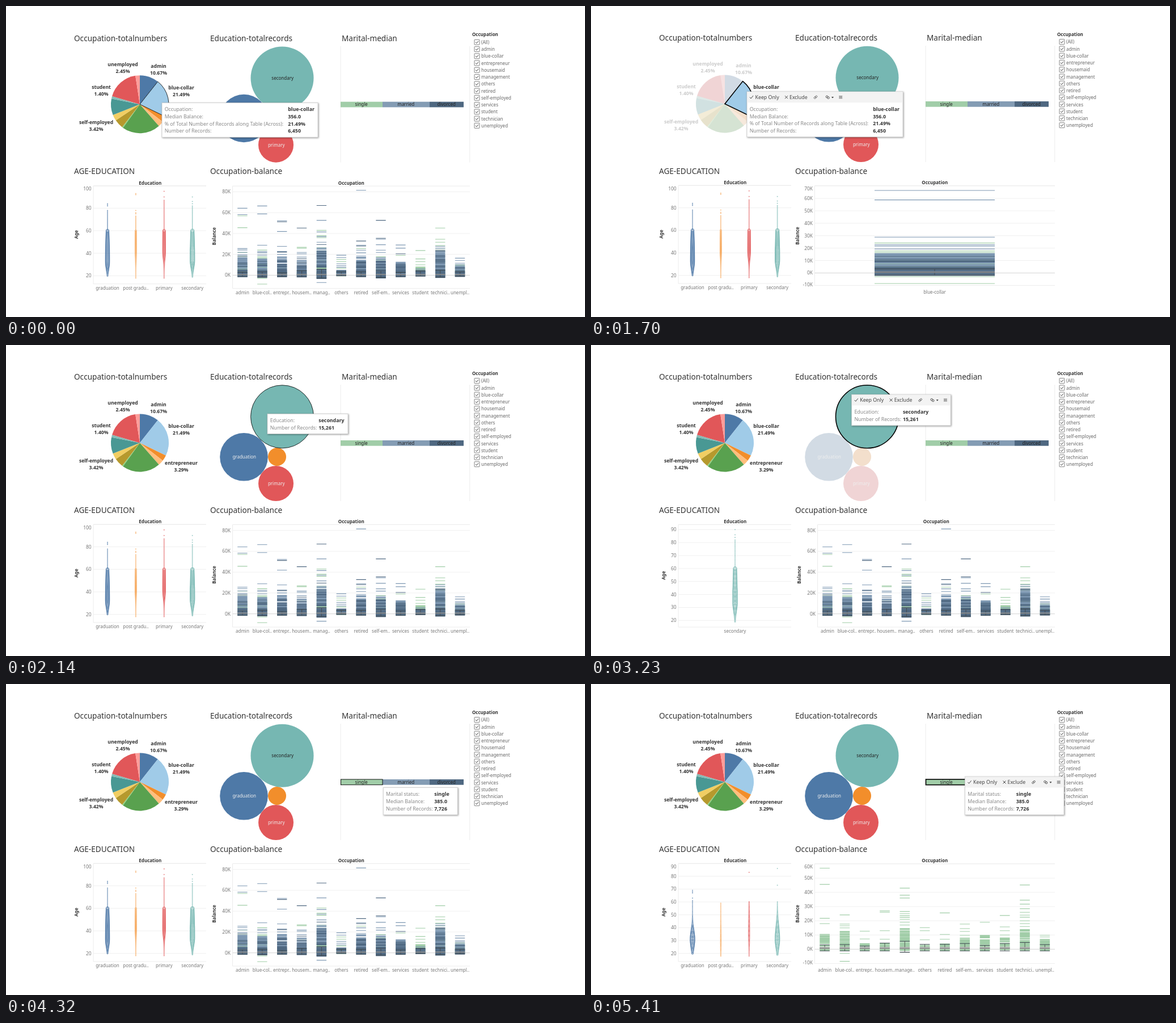
Write an HTML page that moves like this. It is 1021 by 548 pixels and loops after 6.5 s.

```html
<!DOCTYPE html>
<html lang="en">
<head>
<meta charset="utf-8">
<title>Occupation dashboard</title>
<style>
html, body { margin: 0; height: 100%; overflow: hidden; background: #fff; }
svg { display: block; width: 1021px; height: 548px; font: 8px "Noto Sans", sans-serif; fill: #666; }
.title { font-size: 13.6px; font-weight: 300; fill: #333; }
.bold { font-weight: 600; fill: #333; }
.tip { font-size: 8.8px; }
.tip > rect { filter: drop-shadow(1px 1px 1.5px #0006); }
</style>
</head>
<body>
<svg id="stage" viewBox="0 0 1021 548"></svg>
<script>
const SINGLE = '#a1cda8', MARRIED = '#7e98b2', DIVORCED = '#4f6881';
const BLUE = '#4e79a7', ORANGE = '#f28e2b', RED = '#e15759', TEAL = '#76b7b2';

const text = (x, y, s, attrs = '') => `<text x="${x}" y="${y}" ${attrs}>${s}</text>`;
const mid = (x, y, s, attrs = '') => text(x, y, s, 'text-anchor="middle" ' + attrs);
const rect = (x, y, w, h, fill, attrs = '') =>
  `<rect x="${x}" y="${y}" width="${w}" height="${h}" fill="${fill}" ${attrs}/>`;
const path = (d, stroke, width = 1, fill = 'none') =>
  `<path d="${d}" stroke="${stroke}" stroke-width="${width}" fill="${fill}"/>`;
const circle = (x, y, r, fill, attrs = '') => `<circle cx="${x}" cy="${y}" r="${r}" fill="${fill}" ${attrs}/>`;
const range = (a, b) => Array.from({ length: b - a + 1 }, (_, i) => a + i);

function random(seed) {
  return () => (seed = (seed * 16807) % 2147483647) / 2147483647;
}

// Pie: name, share, colour, label position
const slices = [
  ['admin', 10.67, BLUE, 269, 108], ['blue-collar', 21.49, '#a0cbe8', 309, 146],
  ['entrepreneur', 3.29, ORANGE, 309, 211], ['housemaid', 3.1, '#ffbe7d'],
  ['management', 21.35, '#59a14f'], ['others', .6, '#8cd17d'], ['retired', 5.1, '#b6992d'],
  ['self-employed', 3.42, '#f1ce63', 159, 207], ['services', 9.1, '#499894'],
  ['student', 1.4, '#86bcb6', 168, 145], ['technician', 18.03, RED], ['unemployed', 2.45, '#ff9d9a', 206, 105]
];

function pie({ pieHover, pieSelect }) {
  const cx = 236, cy = 172.5, r = 51;
  const point = share => {
    const a = share / 50 * Math.PI;
    return `${cx + r * Math.sin(a)} ${cy - r * Math.cos(a)}`;
  };
  let sum = 0, out = pieSelect ? circle(cx, cy, r, '#f4f4f4') : '', labels = '', outline = '';
  for (const [name, share, color, x, y] of slices) {
    const d = `M${cx} ${cy}L${point(sum)}A${r} ${r} 0 0 1 ${point(sum += share)}Z`;
    const picked = name === 'blue-collar', faded = pieSelect && !picked;
    out += `<path d="${d}" fill="${color}" opacity="${faded ? .2 : 1}"/>`;
    if (picked && (pieHover || pieSelect)) outline = path(d, '#000', pieSelect ? 1.6 : .8);
    if (!x) continue;
    const attrs = `class="bold" font-size="8.6" opacity="${faded ? .25 : 1}"`;
    labels += mid(x, y, name, attrs) + mid(x, y + 12.3, share.toFixed(2) + '%', attrs);
  }
  return out + outline + labels;
}

function bubbles({ bubbleHover, bubbleSelect }) {
  return [
    ['graduation', 419.5, 197.3, 42.3, BLUE], ['', 478, 197, 16, ORANGE],
    ['primary', 476, 244, 31, RED], ['secondary', 487, 126.3, 55.5, TEAL]
  ].map(([name, x, y, r, color]) => {
    const main = name === 'secondary', faded = bubbleSelect && !main;
    const stroke = main && (bubbleHover || bubbleSelect) ? `stroke="#000" stroke-width="${bubbleSelect ? 1.6 : .8}"` : '';
    return (faded ? circle(x, y, r, '#f4f4f4') : '') + circle(x, y, r, color, `${stroke} opacity="${faded ? .2 : 1}"`) +
      mid(x + .7, y + 3, name, `fill="${main ? '#222' : '#eee'}"`);
  }).join('');
}

function marital({ barHover, barSelect }) {
  let out = path('M590 70V275M817.8 70V275', '#ececec');
  const bars = [['single', 590, 74, SINGLE], ['married', 664, 83, '#849cb4'], ['divorced', 747, 60, DIVORCED]];
  for (const [name, x, w, color] of barSelect ? bars.slice(0, 1) : bars)
    out += rect(x, 168, w, 9.7, color) + mid(x + w / 2 - .3, 175.8, name, 'fill="#222"');
  if (barHover || barSelect) out += rect(590.5, 168, 73.5, 9.7, 'none', `stroke="#000" stroke-width="${barSelect ? 1.6 : .9}"`);
  return out;
}

function legend() {
  return text(822, 52.5, 'Occupation', 'class="bold"') + ['(All)', ...slices.map(s => s[0])].map((name, i) => {
    const y = 63.3 + i * 12.25;
    return rect(826, y - 4.7, 9, 9, '#fff', 'stroke="#777" stroke-width=".9" rx=".6"') +
      path(`M828 ${y - .2}l1.8 2 3.3-4`, '#444') + text(838, y + 3, name);
  }).join('');
}

// Axis ticks: [label, y, label y when pushed inside]
function grid(left, right, bottom, ticks) {
  return path(`M${left} 316.5V${bottom}M${left} ${bottom}H${right}M${left} 316.5H${right}`, '#ececec') +
    ticks.map(([label, y, labelY = y]) =>
      path(`M${left} ${y}H${right}`, label === '0K' ? '#d4d4d4' : '#f0f0f0') +
      text(left - 3.5, labelY + 3, label, 'text-anchor="end" font-size="8.4" fill="#777"')).join('');
}
const axisTitle = (x, y, s) => mid(0, 0, s, `class="bold" transform="translate(${x} ${y}) rotate(-90)"`);

// Age dots: name, colour, first age, last age, far ages, largest radius, peak age, spread above it
const ages = [
  ['graduation', BLUE, 20, 78, [82, 83, 84], 3.9, 33, 29], ['post gradu..', '#f5a04c', 18, 73, [75, 76, 78, 92, 93], 1.5, 42, 30],
  ['primary', RED, 18, 87, [90, 95], 2.7, 42, 40], ['secondary', TEAL, 19, 82, [84, 86, 90], 4.2, 34, 32]
];
const singleAges = [
  ['graduation', BLUE, 20, 61, [63, 67, 68, 69], 4.3, 31, 7], ['post gradu..', '#f5a04c', 18, 59, [], .9, 30, 9],
  ['primary', RED, 18, 60, [83], 1.3, 35, 14], ['secondary', TEAL, 19, 60, [73, 86], 4.2, 31, 10]
];

function ageChart({ bubbleSelect, barSelect }) {
  const scale = bubbleSelect ? 2.286 : barSelect ? 2.267 : 1.985;
  const zero = bubbleSelect ? 485.3 : 474.7, bottom = bubbleSelect ? 497 : 489;
  const at = age => zero - (age - 20) * scale;
  const step = bubbleSelect || barSelect ? 10 : 20, ticks = [];
  for (let a = 20; a <= (step === 10 ? 90 : 100); a += step) ticks.push([a, at(a), Math.max(at(a), 321.7)]);
  const columns = bubbleSelect ? ages.slice(3) : barSelect ? singleAges : ages;
  return mid(254.3, 314, 'Education', 'class="bold"') + grid(154, 353, bottom, ticks) +
    axisTitle(bubbleSelect || barSelect ? 131 : 127, bubbleSelect ? 406 : 402, 'Age') +
    columns.map(([name, color, first, last, far, max, peak, spread], i) => {
      const x = bubbleSelect ? 254 : 179 + i * 49.9;
      const dots = [...range(first, last), ...far].map(a => {
        const bump = Math.exp(-(((a - peak) / (a < peak ? 7 : spread)) ** 2) / 2);
        const r = a > 60 ? .5 : .5 + (max - .5) * bump;
        return circle(x, at(a), r, 'none');
      }).join('');
      return `<g stroke="${color}" stroke-width=".9">${dots}</g>` + mid(x, bottom + 10, name, 'fill="#777"');
    }).join('');
}

// Balances in thousands: name, dense top of singles and others, whisker top, low end, outliers by status
const balances = [
  ['admin', 10.5, 17, 3, -1.7, [57, 45.6, 21.7, 18], [64.2, 58.2, 25.6, 24.2, 22, 19.5], [18.2]],
  ['blue-col..', 13, 16.5, 3.2, -2.2, [24.1, 17.7, 16.5, 15, -3, -8.5], [66.4, 58.8, 28.8, 22.6, 21.5, 19.3], []],
  ['entrepr..', 4, 18, 2.2, -1.7, [12.7, 7.2], [52.2, 41.9, 27.7, 22.8, 20], [51.2, 22.2]],
  ['housem..', 4.5, 15, 4.3, -1.9, [26.9, 26, 13, 7], [21.8, 20.5, 17.5], [45.2, 16]],
  ['manag..', 15, 27, 5.6, -3.5, [43, 38, 36, 26.5, 25, 23.5, 22.3, 21, 19, 17], [52.7, 41.5, 37, 31.6, -7], [66.9, 29.5]],
  ['others', 3, 5, 3.4, -.8, [13, 6.6, 15.2], [19.2, 17, 11, 9.2, 7.6], []],
  ['retired', 4, 19, 3.4, -1.7, [25.5, 10.4, 7], [81.4, 28.8, 24, 21.5], [32.8, 28]],
  ['self-em..', 8, 17, 4, -2.9, [17.7, 14.5, 12.5, 9.8], [34.5, 29.3, 24, 21.8], [52.7, 35.5]],
  ['services', 10, 13, 2.7, -1.9, [19], [29, 26], [20.5]],
  ['student', 8, 4.5, 4, -.9, [23.7, 15.7, 13, 10], [6], []],
  ['technici..', 14, 23, 4.7, -2.3, [45.2, 34.5, 31.7, 28.5, 26, 24, 22.5, 20, 18, 16], [27.7, 26], [24, 23]],
  ['unempl..', 7, 9, 3.2, -1.2, [9.8, 8.6], [16.3, 14.2, 11.5, 10.2], []]
];

function dense(rnd, top, low, perK, power) {
  const up = Array.from({ length: top * perK }, () => top * rnd() ** power);
  const down = Array.from({ length: -low * perK }, () => low * rnd());
  return [...up, ...down];
}

function balanceChart({ pieSelect, barSelect }) {
  const left = pieSelect || barSelect ? 394.5 : 399.5;
  const scale = pieSelect ? 2.19 : barSelect ? 2.505 : 1.8375;
  const zero = pieSelect ? 470.4 : barSelect ? 467.3 : 473.7;
  const bottom = pieSelect || barSelect ? 492.5 : 497;
  const at = k => +(zero - k * scale).toFixed(1);
  const [lo, hi, step] = pieSelect ? [-10, 70, 10] : barSelect ? [-10, 60, 10] : [0, 80, 20];
  const ticks = [];
  for (let k = lo; k <= hi; k += step) ticks.push([k + 'K', at(k), Math.min(490.7, Math.max(at(k), 321.7))]);
  const mx = (left + 818) / 2;
  let out = mid(mx, 314, 'Occupation', 'class="bold"') + grid(left, 818, bottom, ticks) +
    axisTitle(left - (left > 395 ? 30 : 28), 405, 'Balance');

  balances.forEach(([name, sTop, mTop, whisker, low, s, m, d], i) => {
    if (pieSelect && i !== 1) return;
    const rnd = random(917 + i * 7331), pitch = (818 - left) / 12;
    const x = pieSelect ? 606 : left + pitch * (i + .5), w = pieSelect ? 212 : pitch / 2;
    const marks = (values, color) =>
      path(values.map(k => `M${(x - w / 2).toFixed(1)} ${at(k)}h${w.toFixed(1)}`).join(''), color, 1.1);
    const box = (a, b, color, attrs = '') => rect(x - w / 2, at(b), w, (b - a) * scale, color, attrs);
    out += marks([...dense(rnd, sTop, -1, 6, 1.2), ...s], SINGLE);
    if (!barSelect) {
      out += marks([...dense(rnd, mTop, low, 4.5, 1.4), ...m], MARRIED) +
        marks([...dense(rnd, mTop * .85, low, 1.9, 1.8), ...d], DIVORCED) +
        marks(dense(rnd, 4.8, low, 2.2, .9), DIVORCED);
    }
    const foot = barSelect ? (i === 4 ? -2.1 : -1.2) : low * .75;
    out += box(.1, barSelect ? 1.7 : 1.3, '#b9b9b9', `opacity="${barSelect ? .9 : .65}"`) +
      path(`M${x} ${at(whisker)}V${at(1.4)}M${x} ${at(.1)}V${at(foot)}`, '#444', .8) +
      marks([whisker, foot], '#3f4a50') + marks([.6], '#777');
    const label = pieSelect ? 'blue-collar' : barSelect && i === 4 ? 'manage..' : name;
    out += mid(x, 507, label, 'fill="#777"');
  });
  return out;
}

function tooltip({ x, y, w, valueX, rows, menu }) {
  const first = y + (menu ? 31 : 11.7), h = first - y + (rows.length - 1) * 12.6 + 11;
  let out = rect(x, y, w, h, '#fff', 'stroke="#ccc" stroke-width=".8"');
  if (menu) {
    const c = y + 9.7;
    out += `<path d="M${x + .4} ${y + .4}h${w - .8}v18.8h${.8 - w}z" fill="#f3f3f3"/>` +
      path(`M${x + 5} ${c}l2 2.3 4-5M${x + 67} ${c - 2.5}l5 5m0-5l-5 5`, '#444') +
      text(x + 14.5, c + 3.2, 'Keep Only', 'fill="#444"') + text(x + 75, c + 3.2, 'Exclude', 'fill="#444"') +
      `<g stroke="#666" stroke-width=".9" transform="rotate(-40 ${x + 121} ${c})">` +
      rect(x + 117.7, c - 1.5, 4, 3, 'none', 'rx="1.5"') + rect(x + 120.3, c - 1.5, 4, 3, 'none', 'rx="1.5"') + '</g>' +
      circle(x + 141, c - .8, 1.8, 'none', 'stroke="#555"') + circle(x + 143.5, c + 1, 1.8, 'none', 'stroke="#555"') +
      `<path d="M${x + 149} ${c - .8}h4l-2 2.5z" fill="#333"/>` +
      path(`M${x + 162} ${c - 2}h6.5m-6.5 2h6.5m-6.5 2h6.5M${x + 164} ${c - 2.5}v5m2.4-5v5`, '#777', .8);
  }
  rows.forEach(([label, value], i) => {
    const base = first + i * 12.6 + 3.1;
    out += text(x + 4.7, base, label + ':', 'fill="#888"') + text(x + valueX, base, value, 'class="bold"');
  });
  return `<g class="tip">${out}</g>`;
}

const jobRows = [['Occupation', 'blue-collar'], ['Median Balance', '356.0'],
  ['% of Total Number of Records along Table (Across)', '21.49%'], ['Number of Records', '6,450']];
const schoolRows = [['Education', 'secondary'], ['Number of Records', '15,261']];
const statusRows = [['Marital status', 'single'], ['Median Balance', '385.0'], ['Number of Records', '7,726']];

const scenes = [
  { pieHover: true, shift: .7, tip: { x: 275, y: 170, w: 275, valueX: 222.3, rows: jobRows } },
  { pieSelect: true, tip: { x: 275, y: 151, w: 275, valueX: 222.3, rows: jobRows, menu: true } },
  { bubbleHover: true, tip: { x: 461, y: 121.3, w: 142, valueX: 90.3, rows: schoolRows } },
  { bubbleSelect: true, tip: { x: 459.7, y: 87.3, w: 174.5, valueX: 90.3, rows: schoolRows, menu: true } },
  { barHover: true, tip: { x: 665.3, y: 182.5, w: 131, valueX: 90, rows: statusRows } },
  { barSelect: true, tip: { x: 659.5, y: 163.3, w: 174.5, valueX: 90.3, rows: statusRows, menu: true } }
];

const titles = [[120, 61, 'Occupation-totalnumbers'], [360, 61, 'Education-totalrecords'], [592, 61, 'Marital-median'],
  [120, 295.7, 'AGE-EDUCATION'], [360, 295.7, 'Occupation-balance']]
  .map(([x, y, s]) => text(x, y, s, 'class="title"')).join('');

const stage = document.getElementById('stage');
stage.innerHTML = scenes.map(s => `<g transform="translate(0 ${s.shift || 0})">` + titles + pie(s) + bubbles(s) +
  marital(s) + legend() + ageChart(s) + balanceChart(s) + tooltip(s.tip) + '</g>').join('');
const views = [...stage.children];

function show() {
  const t = performance.now() % 6500;
  const current = t < 1050 ? 0 : 1 + Math.floor((t - 1050) / 1090);
  views.forEach((view, i) => view.style.display = i === current ? '' : 'none');
  requestAnimationFrame(show);
}
show();
</script>
</body>
</html>
```
